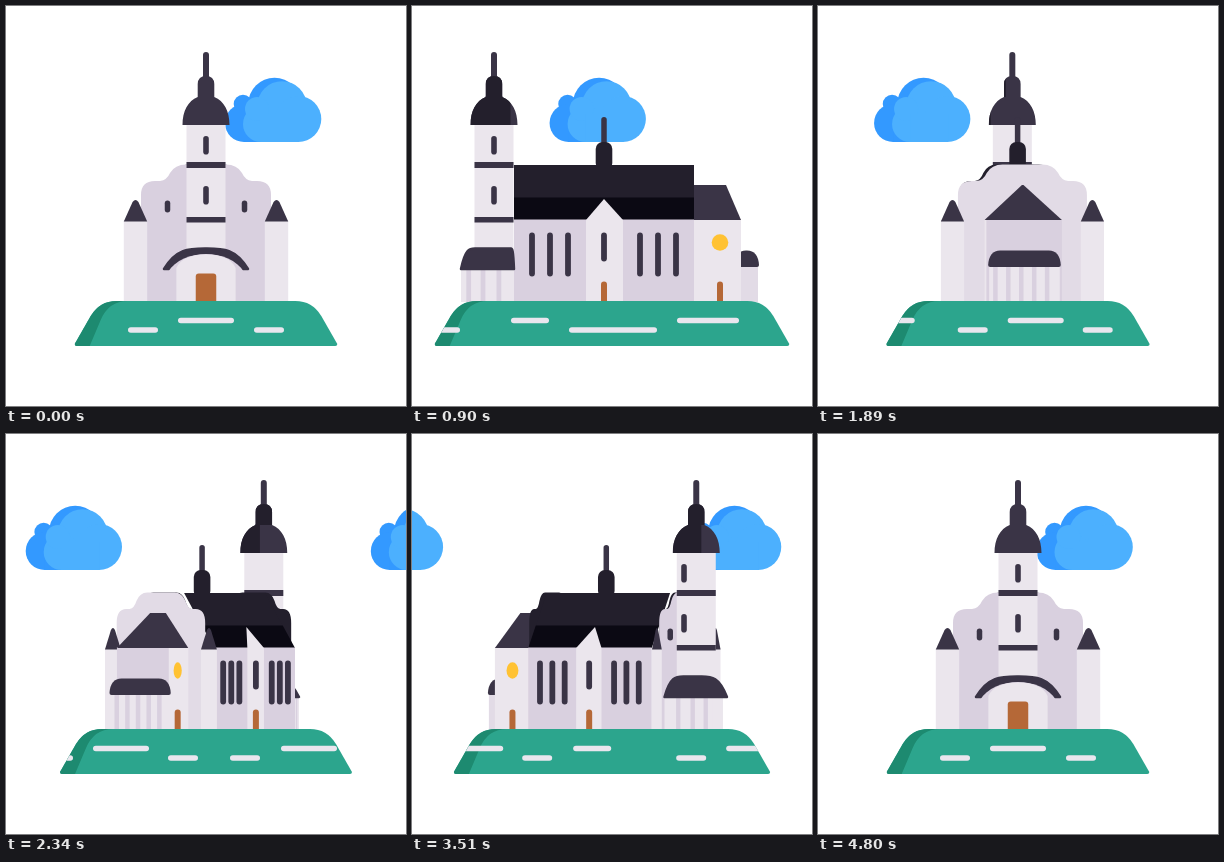
An HTML page that plays this animation: 400x400 px, repeating every 6830 ms.

```html
<!DOCTYPE html>
<html lang="en">
<head>
<meta charset="utf-8">
<title>Turning church</title>
<style>
html, body { margin: 0; width: 100%; height: 100%; overflow: hidden; background: #fff; }
svg { display: block; width: 100vw; height: 100vh; }
</style>
</head>
<body>
<svg id="stage" viewBox="0 0 400 400"></svg>
<script>
const LOOP = 6830, TURN = 4800, STEP = 30;
const INK = '#3a3446', DARK = '#231f2c', BLACK = '#0b0913';
const LIGHT = '#ebe6ed', MAUVE = '#d9d0df', PALE = '#e2dbe6', WOOD = '#b56837';
const KEYS = [0, 900, 1440, 2340, 3060, 3960, 4800];
const ANGLE = [0, 90, 136.5, 214.4, 283, 330.6, 360];
const TRAVEL = [0, 230, 356, 563, 721, 870, 945];

// Smooth curve through the key values
function track(values, t) {
  const last = KEYS.length - 1;
  const secant = i => (values[i + 1] - values[i]) / (KEYS[i + 1] - KEYS[i]);
  const slope = i => i === 0 ? secant(0) : i === last ? 0.55 * secant(last - 1)
    : (secant(i - 1) + secant(i)) / 2;
  let i = 0;
  while (i < last - 1 && t >= KEYS[i + 1]) i++;
  const d = KEYS[i + 1] - KEYS[i], u = (t - KEYS[i]) / d, v = 1 - u;
  return values[i] * v * v * (1 + 2 * u) + slope(i) * d * u * v * v
    + values[i + 1] * u * u * (3 - 2 * u) - slope(i + 1) * d * u * u * v;
}

const n = v => +v.toFixed(2);
const path = (d, fill, extra = '') => `<path d="${d}" fill="${fill}" ${extra}/>`;
const poly = (pts, fill) =>
  `<polygon points="${pts.map(p => n(p[0]) + ',' + p[1]).join(' ')}" fill="${fill}"/>`;
const circle = (x, y, r, fill, rx = r) =>
  `<ellipse cx="${n(x)}" cy="${y}" rx="${n(rx)}" ry="${r}" fill="${fill}"/>`;
const bar = (x, y, w, h, fill, r = 0) =>
  `<rect x="${n(x)}" y="${y}" width="${n(Math.max(0, w))}" height="${h}" rx="${r}" fill="${fill}"/>`;
const span = (a, b, y, h, fill) => bar(Math.min(a, b), y, Math.abs(b - a), h, fill);
const slit = (x, y, h, w = 5.6) => bar(x - w / 2, y, w, h, INK, w / 2);
const door = (x, y, w) =>
  path(`M${n(x - w / 2)},296V${y + 3}q0,-3 3,-3H${n(x + w / 2 - 3)}q3,0 3,3V296z`, WOOD);

function cloud(x) {
  const back = '#3399ff', front = '#4cb0fe';
  return `<g transform="translate(${n(x - 267)} 0)">`
    + circle(268.5, 98, 26.3, back) + circle(237, 98, 9.3, back) + circle(238, 117, 19, back)
    + bar(238, 110, 40, 26, back) + circle(276, 100, 24.8, front) + circle(292.3, 113, 23, front)
    + circle(255, 118, 18, front) + circle(251, 103, 12, front) + bar(255, 108, 38, 28, front) + '</g>';
}

function ground(half, p) {
  const l = 200 - half, r = 200 + half;
  const shape = `M${n(l)},338L${n(l + 16)},310Q${n(l + 25)},295 ${n(l + 42)},295`
    + `H${n(r - 42)}Q${n(r - 25)},295 ${n(r - 16)},310L${n(r)},338q0,2 -2,2H${n(l + 2)}q-2,0 -2,-2z`;
  // Road marks: start, length, upper or lower row
  const marks = [[122, 30, 0], [172, 56, 1], [248, 30, 0], [329, 38, 1], [387, 88, 0], [495, 62, 1],
    [600, 30, 0], [650, 56, 1], [725, 30, 0], [787, 30, 0], [838, 56, 1], [913, 30, 0], [964, 38, 1],
    [1067, 30, 0], [1117, 56, 1], [1193, 30, 0]];
  return `<clipPath id="lawn"><path d="${shape}"/></clipPath>` + path(shape, '#2ca58d')
    + '<g clip-path="url(#lawn)">'
    + path(`M${n(l)},340H${n(l + 15)}L${n(l + 26)},314Q${n(l + 34)},295 ${n(l + 53)},295H${n(l)}z`, '#1d8a70')
    + marks.map(([x, w, up]) => bar(x - p, up ? 311.7 : 321.2, w, 5.6, '#e9e6ee', 2.8)).join('') + '</g>';
}

function gable(c, w, fill) {
  const x = v => n(c + v * w);
  return path(`M${x(-65)},215V189Q${x(-65)},175 ${x(-51)},175H${x(-46)}Q${x(-39)},174 ${x(-36)},167`
    + `Q${x(-31)},158.5 ${x(-20)},158.5H${x(20)}Q${x(31)},158.5 ${x(36)},167`
    + `Q${x(39)},174 ${x(46)},175H${x(51)}Q${x(65)},175 ${x(65)},189V215z`, fill);
}

function turret(c, w) {
  const h = 11.7 * w, x = v => n(c + v * h);
  return bar(c - h, 214, 2 * h, 82, LIGHT)
    + path(`M${x(-1)},215.5L${x(-0.25)},196Q${x(0)},192 ${x(0.25)},196L${x(1)},215.5z`, INK);
}

function facade(c, w, isFront) {
  const a = Math.abs(w);
  if (a < 0.02) return '';
  const wall = isFront ? MAUVE : PALE;
  let out = gable(c, a, wall) + bar(c - 65 * a, 214, 130 * a, 82, wall)
    + turret(c - 70.5 * a, a) + turret(c + 70.5 * a, a);
  if (isFront) out += slit(c - 38.5 * a, 194.5, 12, 5.5) + slit(c + 38.5 * a, 194.5, 12, 5.5);
  return out;
}

function tower(x, s, w) {
  const a = Math.abs(s), dir = Math.sign(s);
  const dome = 'M-23.5,119C-23.5,105 -18,95 -8.3,91V78Q-8,70 0,70Q8,70 8.3,78V91C18,95 23.5,105 23.5,119z';
  let out = bar(x - 19.5, 118, 39, 178, LIGHT)
    + bar(x - 19.5, 156, 39, 6, INK) + bar(x - 19.5, 211, 39, 5.5, INK);
  const frontHole = w < 0 ? 99 : -dir * 19 * Math.sqrt(a);
  const sideHole = a < 0.1 ? 99 : dir * Math.sign(w) * 19 * Math.sqrt(Math.abs(w));
  for (const o of [frontHole, sideHole])
    if (Math.abs(o) < 13) out += slit(x + o, 130, 18.5) + slit(x + o, 180, 18.5);
  return out + slit(x, 46, 32, 6)
    + `<clipPath id="dome"><path d="${dome}" transform="translate(${n(x)} 0)"/></clipPath>`
    + '<g clip-path="url(#dome)">' + bar(x - 24, 69, 48, 51, INK)
    + bar(x - 23.5, 90, 40 * a, 30, DARK) + bar(x - 8.3, 69, 16.6 * Math.min(1, 2.2 * a), 22, DARK) + '</g>';
}

function porch(at, s, w) {
  const a = Math.abs(w), dir = Math.sign(s) * (w < 0 ? -1 : 1);
  const back = at(98), front = at(151), hb = 42 * a, hf = 41 * a * a;
  const l = Math.min(back - hb, front - hf), r = Math.max(back + hb, front + hf);
  const outer = Math.min(14 + 27 * a, (r - l) / 2), inner = Math.min(3 + 38 * a, (r - l) / 2);
  const [cl, cr] = front < back ? [outer, inner] : [inner, outer];
  const sideA = front + dir * hf, sideB = back + dir * hb;
  let out = '';
  if (Math.abs(s) > 0.02) {
    out += span(sideA, sideB, 262, 34, LIGHT);
    for (const k of [0.1, 0.37, 0.67])
      out += span(sideA + (sideB - sideA) * k, sideA + (sideB - sideA) * (k + 0.09), 264, 32, MAUVE);
    if (w >= 0) out += bar(front - hf + 4, 262, 2 * hf - 8, 34, LIGHT);
  }
  out += path(`M${n(l)},263C${n(l + cl * 0.3)},243 ${n(l + cl * 0.6)},242.5 ${n(l + cl)},242.5`
    + `H${n(r - cr)}C${n(r - cr * 0.6)},242.5 ${n(r - cr * 0.3)},243 ${n(r)},263z`,
    INK, `stroke="${INK}" stroke-width="2.5" stroke-linejoin="round"`);
  const h = hf - 3;
  if (w > 0 && h > 6) {
    const x = v => n(front + v * h);
    out += path(`M${x(-1)},296V266C${x(-0.62)},242 ${x(0.62)},242 ${x(1)},266V296z`, a > 0.9 ? MAUVE : LIGHT)
      + path(`M${x(-0.78)},296V262Q${x(-0.62)},248.5 ${x(0)},248.5Q${x(0.62)},248.5 ${x(0.78)},262V296z`, LIGHT)
      + door(front, 267.5, 20.5 * a * a);
  }
  return out;
}

function chapel(at, w) {
  const h = 36 * Math.abs(w) * (w < 0 ? 1 : 0.4), a = at(-147), b = at(-122);
  const l = Math.min(a, b) - h, r = Math.max(a, b) + h, width = r - l;
  let out = bar(l + 1, 258, width - 2, 38, w < 0 ? LIGHT : PALE);
  if (w < -0.1) {
    for (let i = 0; i < 5; i++) out += bar(l + 5 + i * (width - 8) / 5, 260, 4.5, 36, MAUVE);
  }
  return out + path(`M${n(l)},259Q${n(l + 1)},244.5 ${n(l + 12)},244.5H${n(r - 12)}`
    + `Q${n(r - 1)},244.5 ${n(r)},259q0,2 -2,2H${n(l + 2)}q-2,0 -2,-2z`, INK);
}

function apse(at, s, w) {
  const h = 38 * Math.abs(w) * (w < 0 ? 1 : 0.85);
  const dir = Math.sign(s) * (w < 0 ? -1 : 1);
  const end = at(-129), root = at(w < 0 ? -89 : -80);
  const ridge = [at(-114), at(-82)];
  let out = span(end + dir * h, root + dir * h, 213, 83, LIGHT);
  if (w < 0) out += bar(end - h, 213, 2 * h, 83, MAUVE);
  out += poly([[Math.min(end, root) - h, 214], [Math.min(...ridge), 179],
    [Math.max(...ridge), 179], [Math.max(end, root) + h, 214]], INK);
  if (Math.abs(s) > 0.08) {
    const x = at(-108) + dir * h * 0.95;
    out += circle(x, 236.5, 8.3, '#ffc233', 8.3 * Math.abs(s)) + door(x, 275.5, 6);
  }
  return out;
}

function nave(s, w) {
  const dir = Math.sign(s), a = Math.abs(s), width = Math.abs(w);
  const x = (z, half) => 200 - dir * a ** 1.12 * z + w * dir * half;
  const quad = (y1, h1, y2, h2, fill) =>
    poly([[x(98, h1), y1], [x(-82, h1), y1], [x(-82, h2), y2], [x(98, h2), y2]], fill);
  const spire = 200 - 8 * a;
  let out = slit(spire, 111, 34, 5.5) + bar(spire - 8.3, 136, 16.6, 28, DARK, 7)
    + gable(200 - s * 98, width * 0.84, DARK) + gable(200 + s * 84, width * 0.84, DARK)
    + quad(159, 22, 192, 48, DARK) + quad(191.5, 48, 214, 66, BLACK) + quad(213.5, 66, 296, 66, MAUVE);
  if (a < 0.05) return out;
  out += poly([[x(26, 68), 214], [x(8, 54), 193], [x(-11, 68), 214], [x(-11, 68), 296], [x(26, 68), 296]], LIGHT);
  for (const mid of [62, -46])
    for (const k of [-18, 0, 18]) out += slit(x(mid + k, 67.5), 226.5, 44, 5.8 * Math.min(1, a * 3));
  return out + slit(x(8, 68), 226.5, 29, 5.8) + door(x(8, 68), 275.5, 6);
}

function scene(t) {
  const turn = track(ANGLE, t) * Math.PI / 180, p = track(TRAVEL, t);
  const sine = Math.abs(Math.sin(turn)) < 1e-6 ? 0 : Math.sin(turn);
  const s = Math.sign(sine) * Math.abs(sine) ** 1.25, a = Math.abs(s);
  const facing = Math.cos(turn) > -1e-6 ? 1 : -1;
  const w = facing * (1 - a ** 1.6);
  const at = z => 200 - s * z;
  const far = z => 200 - Math.sign(s) * a ** (facing > 0 ? 0.65 : 1) * z;
  const body = facing > 0
    ? [chapel(far, w), apse(far, s, w), nave(s, w), facade(at(104), w, true),
      tower(at(118), s, w), porch(at, s, w)]
    : [porch(at, s, w), tower(at(118), s, w), nave(s, w), facade(at(-92), w, false),
      apse(far, s, w), chapel(far, w)];
  return cloud(267 - 0.354 * p) + cloud(266.5 + 0.383 * (945 - p))
    + body.join('') + ground(177.3 - 46 * Math.abs(w), p);
}

const stage = document.getElementById('stage');
const start = performance.now();
function draw() {
  const t = (performance.now() - start) % LOOP;
  stage.innerHTML = scene(Math.min(TURN, Math.floor(t / STEP) * STEP));
  requestAnimationFrame(draw);
}
draw();
</script>
</body>
</html>
```
